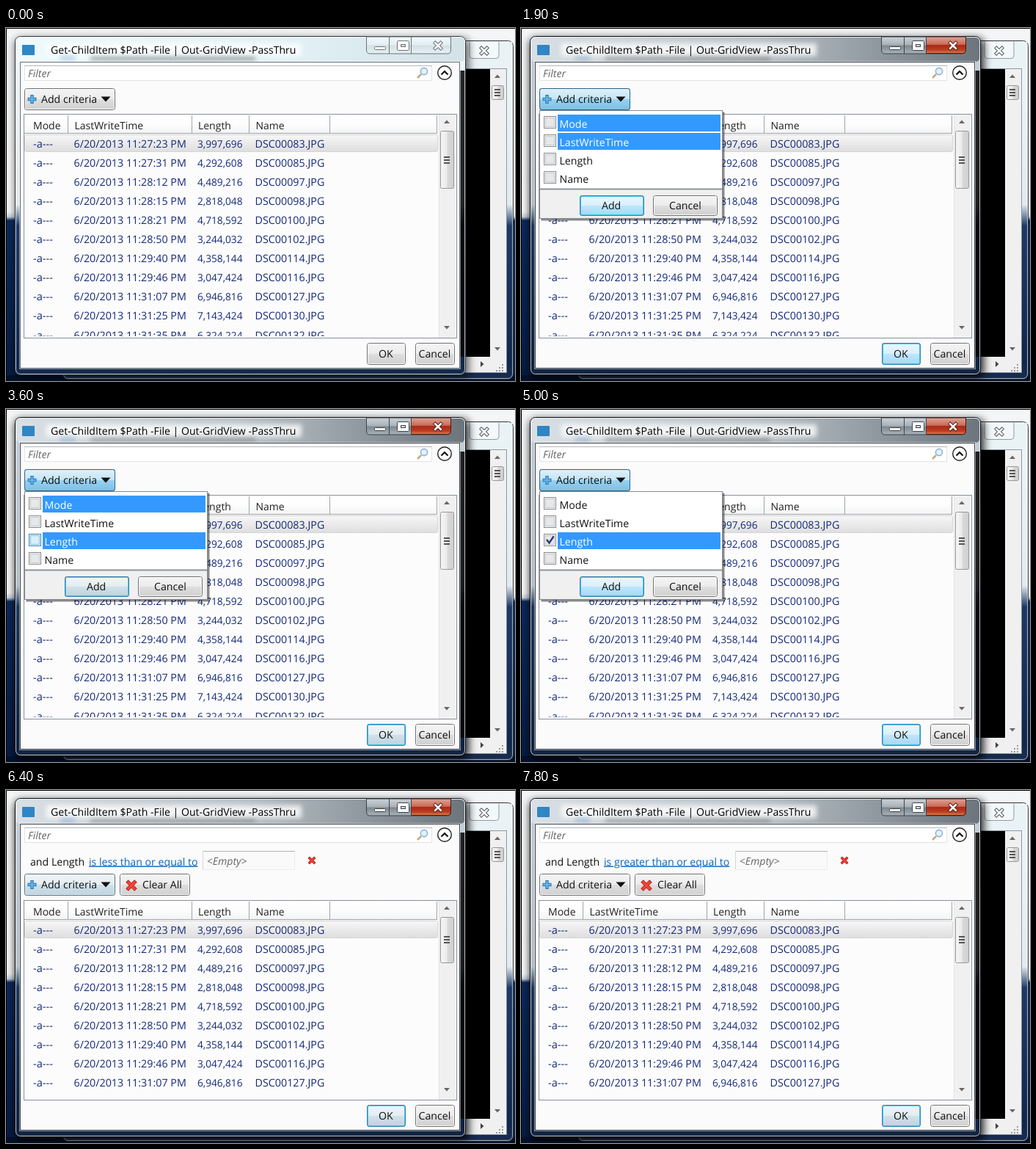
An HTML page that plays this animation: 694 by 481 pixels, repeating every 8 s.

```html
<!DOCTYPE html>
<html lang="en">
<head>
<meta charset="utf-8">
<title>Out-GridView criteria</title>
<style>
  html, body { margin: 0; width: 100%; height: 100%; overflow: hidden; background: #000; }
  svg { display: block; width: 694px; height: 481px; }
  text { font-family: "Open Sans", "Noto Sans", sans-serif; font-size: 14.15px; text-rendering: geometricPrecision; white-space: pre; }
</style>
</head>
<body>
<svg id="stage" viewBox="0 0 694 481" xmlns="http://www.w3.org/2000/svg">
  <defs id="defs"></defs>
  <g id="back"></g>
  <g id="dialog"></g>
</svg>
<script>
const LOOP = 8000;
const el = id => document.getElementById(id);

const gradient = (id, stops, extra = 'x2="0" y2="1"') =>
  `<linearGradient id="${id}" ${extra}>` +
  stops.map(([at, c]) => `<stop offset="${at}" stop-color="${c}"/>`).join('') +
  '</linearGradient>';
const tall = 'gradientUnits="userSpaceOnUse" x1="0" y1="0" x2="0" y2="481"';

el('defs').innerHTML =
  gradient('desk', [[0, '#f4f5f6'], [.52, '#fbfbfb'], [.535, '#c9d5e2'], [.545, '#0b2a5c'], [1, '#061c44']], tall) +
  gradient('glass', [[0, '#eef8fb'], [.5, '#e3eaee'], [.56, '#1d3a66'], [.95, '#10274c'], [1, '#1b2f4e']], tall) +
  gradient('glassOn', [[0, '#c6d0d8'], [.5, '#b4bec7'], [.56, '#1b3559'], [.95, '#0e2140'], [1, '#1a2b45']], tall) +
  gradient('shade', [[0, '#eefafd'], [.6, '#e2f1f5'], [1, '#d3e2e7']], 'x2="1" y2="0"') +
  gradient('shadeOn', [[0, '#d9e0e5'], [.5, '#bcc4ca'], [.8, '#8b949b'], [1, '#6d757c']], 'x2="1" y2="0"') +
  gradient('face', [[0, '#f4f4f4'], [.49, '#ececec'], [.51, '#dedede'], [1, '#d0d0d0']]) +
  gradient('blue', [[0, '#eaf6fd'], [.49, '#d9f0fc'], [.51, '#bee6fd'], [1, '#a7d9f5']]) +
  gradient('deep', [[0, '#e0f0f9'], [.49, '#c4e5f6'], [.51, '#98d1ef'], [1, '#7fbfe2']]) +
  gradient('cap', [[0, '#f3fafc'], [.48, '#e3eef1'], [.52, '#d3e0e4'], [1, '#e6f1f4']]) +
  gradient('capOn', [[0, '#ccd2d7'], [.48, '#a9b1b8'], [.52, '#7e878f'], [1, '#a9b3ba']]) +
  gradient('red', [[0, '#e0a497'], [.46, '#c96a58'], [.5, '#ab2a16'], [.8, '#bd3c22'], [1, '#df8350']]) +
  gradient('picked', [[0, '#f7f7f7'], [1, '#dedede']]) +
  gradient('hover', [[0, '#f7fcfe'], [1, '#dcf1fa']]) +
  gradient('head', [[0, '#fff'], [.5, '#fdfdfd'], [1, '#f2f3f4']]) +
  gradient('thumb', [[0, '#f6f6f6'], [.48, '#ebebeb'], [.52, '#dadada'], [1, '#cfcfcf']], 'x2="1" y2="0"') +
  '<filter id="soft" x="-10%" y="-10%" width="120%" height="120%"><feGaussianBlur stdDeviation="6"/></filter>' +
  '<filter id="blur" x="-20%" y="-100%" width="140%" height="300%"><feGaussianBlur stdDeviation="3"/></filter>';

const rect = (x, y, w, h, fill, extra = '') =>
  `<rect x="${x}" y="${y}" width="${w}" height="${h}" fill="${fill}" ${extra}/>`;
const box = (x, y, w, h, fill, stroke, r = 0) =>
  rect(x + .5, y + .5, w - 1, h - 1, fill, `stroke="${stroke}" rx="${r}"`);
const path = (d, fill, extra = '') => `<path d="${d}" fill="${fill}" ${extra}/>`;
const line = (d, stroke, w = 1) => path(d, 'none', `stroke="${stroke}" stroke-width="${w}"`);
const text = (x, y, s, fill = '#111', extra = '') =>
  `<text x="${x}" y="${y}" fill="${fill}" ${extra}>${s.replace('<', '&lt;')}</text>`;
const fade = (o, body) => o > 0 ? `<g opacity="${o}">${body}</g>` : '';
const italic = 'font-style="italic"';

// value of the last key at or before t
const step = (t, keys) => keys.reduce((v, [at, next]) => t >= at ? next : v, 0);

function cross(x, y, r, w, color) {
  return line(`M${x - r} ${y - r}l${2 * r} ${2 * r}M${x + r} ${y - r}l${-2 * r} ${2 * r}`, color, w);
}
const closeGlyph = (x, y, ink) =>
  cross(x, y, 5.4, 4.6, ink) + cross(x, y, 4.7, 2.6, '#fff');
const redCross = (x, y, r, w) =>
  cross(x, y, r, w, '#b91d1d') + cross(x, y, r - .7, w - 1.6, '#ee4438');
const arrow = (x, y, dir) =>
  path(`M${x - 4} ${y - 2 * dir}h8l-4 ${4.5 * dir}z`, '#666');
const grip = (x, y, w) =>
  [-4, 0, 4].map(d => rect(x - w / 2, y + d - 1, w, 2, '#555')).join('');

// glow 0 is plain, 1 is a full blue face
function button(x, y, w, h, glow = 0, label = '', tx = 0) {
  const edge = glow > .25
    ? box(x + 1, y + 1, w - 2, h - 2, 'none', '#3cc8ee', 2) + box(x, y, w, h, 'none', '#3c7fb1', 3)
    : '';
  return box(x, y, w, h, 'url(#face)', '#707070', 3) +
    box(x + 1, y + 1, w - 2, h - 2, 'none', '#fafafa', 2) +
    fade(glow, box(x + 1, y + 1, w - 2, h - 2, 'url(#blue)', '#7fd4f2', 2)) + edge +
    text(tx, y + h / 2 + 5, label);
}

function backdrop() {
  return rect(0, 0, 694, 481, 'url(#desk)') +
    rect(0, 473, 694, 8, '#04112c') +
    box(77, 17, 615, 462, 'url(#glass)', '#2b3036', 7) +
    box(78, 18, 613, 460, 'none', 'rgba(255,255,255,.6)', 6) +
    rect(600, 19, 90, 37, '#e9f2f5') +
    path('M632 18.5v19q0 4 4 4h32q4 0 4-4v-19', '#f3f8fa', 'stroke="#959ba1"') +
    closeGlyph(652, 31, '#555b62') +
    box(84, 55, 599, 415, '#000', '#8c98a6') +
    rect(660, 56, 22, 392, '#f0f0f0') + rect(85, 448, 597, 21, '#f0f0f0') +
    arrow(670, 66, -1) + arrow(670, 437, 1) +
    box(662, 78, 17, 20, 'url(#thumb)', '#969696', 2) + grip(670, 88, 8) +
    path('M647 454v8l4.5-4z', '#444') +
    [0, 1, 2].map(i => [...Array(i + 1).keys()]
      .map(j => rect(676 - 4 * j, 459 + 4 * i - 1, 2, 2, '#9b9b9b')).join('')).join('') +
    line('M.5 481V.5H694', '#000');
}

function frame(on) {
  const suffix = on ? 'On' : '';
  const ink = on ? '#3c434b' : '#6b7479';
  return fade(on ? .85 : .6, rect(12, 14, 619, 463, '#000', 'filter="url(#soft)" rx="8"')) +
    box(12, 11, 615, 462, `url(#glass${suffix})`, on ? '#0c0f13' : '#30373e', 7) +
    rect(14, 13, 611, 33, `url(#shade${suffix})`, 'rx="5"') +
    fade(on ? .3 : .4, rect(115, 37, 225, 7, '#222', 'filter="url(#blur)"')) +
    fade(.3, rect(74, 34, 20, 10, '#3a78b5', 'filter="url(#blur)"')) +
    rect(55, 21, 348, 17, '#fff', 'filter="url(#blur)" opacity=".8"') +
    rect(619, 58, 7, 390, '#000', 'opacity=".85"') +
    box(13, 12, 613, 460, 'none', 'rgba(255,255,255,.7)', 6) +
    box(18, 45, 602, 420, 'none', 'rgba(255,255,255,.5)') +
    rect(22, 23, 17, 14, '#2f86c4', 'rx="1"') +
    text(61, 35, 'Get-ChildItem $Path -File | Out-GridView -PassThru', '#000', 'style="font-size:14.08px"') +
    path('M491.5 12v18q0 5 5 5h105q5 0 5-5v-18z', `url(#cap${suffix})`, `stroke="${ink}"`) +
    (on ? path('M552.5 12v22.5h49q5 0 5-5V12z', 'url(#red)', 'stroke="#4a1a14"') : '') +
    line('M522.5 12v23M552.5 12v23', ink) +
    box(502, 25, 16, 5, '#fff', ink, 1) +
    box(533, 17, 17, 14, '#fff', ink, 1) + box(538, 22, 7, 4, '#d5dbe1', ink) +
    closeGlyph(589, 24, on ? '#5a2a24' : ink) +
    box(19, 46, 600, 418, '#fbfbfb', on ? '#3d454d' : '#66707a');
}

function filterBar() {
  return box(25, 51, 556, 21, '#fff', '#e1e3e6') + line('M25 51.5H581', '#b5b8bd') +
    text(30, 67, 'Filter', '#666', italic) +
    line('M561 68l5-5', '#c9a977', 2.5) +
    '<circle cx="570" cy="59" r="4.6" fill="#e3f1fb" stroke="#8fb2d3" stroke-width="1.6"/>' +
    '<circle cx="598" cy="61" r="9.3" fill="#fff" stroke="#222" stroke-width="1.4"/>' +
    line('M593.5 63.5l4.5-4.5 4.5 4.5', '#111', 2.2);
}

function addCriteria(y, glow, pressed) {
  return button(25, y, 124, 30) +
    fade(glow, box(25, y, 124, 30, 'url(#blue)', '#3c6f95', 3)) +
    (pressed ? box(25, y, 124, 30, 'url(#deep)', '#2c628b', 3) : '') +
    line(`M35.5 ${y + 9}v12M29.5 ${y + 15}h12`, '#2a76b4', 4.4) +
    line(`M35.5 ${y + 10}v10M30.5 ${y + 15}h10`, '#62b4e8', 2.4) +
    text(48, y + 20, 'Add criteria') +
    path(`M129.5 ${y + 11.5}h13l-6.5 7z`, '#111');
}

// time, length, picture number
const files = [
  ['11:27:23', '3,997,696', '083'], ['11:27:31', '4,292,608', '085'],
  ['11:28:12', '4,489,216', '097'], ['11:28:15', '2,818,048', '098'],
  ['11:28:21', '4,718,592', '100'], ['11:28:50', '3,244,032', '102'],
  ['11:29:40', '4,358,144', '114'], ['11:29:46', '3,047,424', '116'],
  ['11:31:07', '6,946,816', '127'], ['11:31:25', '7,143,424', '130'],
  ['11:31:35', '6,324,224', '132']
];

function grid(y, hovered, glow) {
  const ink = '#15297a';
  const shifted = y > 130;
  // the shorter list ends after nine whole rows
  const rows = files.slice(0, shifted ? 9 : 11).map(([time, size, id], i) => {
    const b = y + 45.5 + 26.1 * i;
    return text(37, b, '-a---', ink, 'style="font-size:14.6px"') +
      text(92.5, b, `6/20/2013 ${time} PM`, ink, 'style="font-size:14.3px"') +
      text(261, b, size, ink, 'style="font-size:13.7px"') +
      text(339.5, b, `DSC00${id}.JPG`, ink, 'style="font-size:14.3px"');
  }).join('');
  const top = y + 23;
  return box(24, y, 591, 423 - y, '#fcfcfc', '#8a9099') +
    rect(25, y + 1, 563, 26, 'url(#head)') +
    line(`M25 ${y + 26.5}H588M84.5 ${y + 2}v25M253.5 ${y + 2}v25M331.5 ${y + 2}v25M441.5 ${y + 2}v25M587.5 ${y + 2}v25`, '#a0a4a9') +
    [[37, 'Mode'], [93.5, 'LastWriteTime'], [262, 'Length'], [340.5, 'Name']]
      .map(([x, s]) => text(x, y + 20.5, s, '#222', 'style="font-size:14px"')).join('') +
    box(25, y + 28, 564, 24, 'url(#picked)', '#d4d4d4', 2) +
    fade(glow, box(25, y + 28 + 26.1 * hovered, 564, 25, 'url(#hover)', '#dceff8', 2)) +
    `<clipPath id="list"><rect x="25" y="${y + 27}" width="564" height="${393 - y}"/></clipPath>` +
    `<g clip-path="url(#list)">${rows}</g>` +
    rect(591, y + 1, 22, 421 - y, '#f0f0f0') + line(`M590.5 ${y + 1}V422`, '#e2e2e2') +
    arrow(601, y + 11, -1) + arrow(601, 408, 1) +
    box(592, top, 19, shifted ? 63 : 79, 'url(#thumb)', '#979797', 2) +
    grip(601, top + (shifted ? 31 : 40), 8);
}

function criterion(op, width) {
  const x = 119 + width;
  return text(33, 102.5, 'and Length') +
    text(113, 102.5, op, '#0a66c2', 'text-decoration="underline"') +
    box(x, 83, 126, 26, '#fafafa', '#ececec') + line(`M${x} 83.5h126`, '#b0b3b7') +
    line(`M${x + .5} 83v26`, '#d5d7d9') +
    text(x + 6, 101.5, '<Empty>', '#666', italic) +
    redCross(x + 149, 96, 4.3, 3.4);
}

const popup = (x, y, w, h) =>
  rect(x + 3, y + 3, w, h, '#000', 'opacity=".22"') +
  rect(x + 2, y + 2, w, h, '#000', 'opacity=".3"') + box(x, y, w, h, '#fff', '#85898e');

function fieldMenu(t, pulse) {
  const lit = [
    t < 3800 ? 1 : 0,
    step(t, [[1900, 1], [2700, .6], [3000, 0]]),
    step(t, [[3100, .5], [3200, 1]]),
    step(t, [[4800, 1], [5000, 0]])
  ];
  const over = step(t, [[3300, 1], [3600, 2], [4200, 0]]);
  const rows = ['Mode', 'LastWriteTime', 'Length', 'Name'].map((name, i) => {
    const y = 118 + 25 * i;
    const hot = over && over === i;
    return box(31, y + 2, 17, 17, '#f6f6f6', hot ? '#3c7fb1' : '#8a8a8a') +
      box(33, y + 4, 13, 13, hot ? '#d7effb' : '#e6e8ea', hot ? '#79c0e8' : '#c4c8cc') +
      (i === 2 && t >= 3800 ? line(`M35 ${y + 10}l3.5 4.5 6-9`, '#31347c', 2.4) : '') +
      fade(lit[i], rect(50, y, 222, 23, '#3399ff')) +
      text(52.5, y + 18, name, lit[i] > .5 ? '#fff' : '#111');
  }).join('');
  const add = t >= 4600 ? 1 : pulse;
  return popup(25, 112, 250, 148) + rows +
    rect(26, 220, 248, 39, '#f0f0f0') + line('M26 219.5H274', '#8f9499', 2) +
    button(80, 228, 88, 28, add, 'Add', 110) +
    button(180, 228, 88, 28, 0, 'Cancel', 202);
}

const operators = ['is less than or equal to', 'is greater than or equal to', 'is between',
  'equals', 'does not equal', 'contains', 'does not contain'];

function operatorMenu(t) {
  return popup(113, 107, 182, 161) + operators.map((name, i) => {
    const y = 109 + 22.6 * i;
    const lit = i === 0 || (i === 1 && t >= 7400);
    return (lit ? rect(115, y, 178, 23, '#3399ff') : '') +
      text(118, y + 17.7, name, lit ? '#fff' : '#111', 'style="font-size:14.1px"');
  }).join('');
}

function scene(t) {
  const active = t >= 1300;
  const filtered = t >= 5400;
  const y = filtered ? 150 : 117;
  const pulse = step(t, [[1400, .3], [1500, .65], [1600, 1], [1800, .9], [1900, 1], [2700, .7],
    [3000, .5], [3100, .4], [3200, .3], [3300, .4], [3800, .9], [4200, .7], [4300, .5],
    [4600, .9], [5300, .5], [5400, .2], [5500, 0], [6400, .4], [6500, .6], [6700, .9],
    [6800, 1], [7700, .6], [7800, .4]]);
  const add = step(t, [[900, .3], [1000, .65], [1100, 1], [5400, .5], [5800, .8], [5900, 1],
    [6100, .9], [6200, .8], [6400, .4], [6500, 0]]);
  const hover = step(t, [[5500, .5], [5600, 1], [5800, .5], [5900, 0]]);
  const menu = step(t, [[1800, .6], [1900, 1], [5300, .6], [5400, 0]]);
  const ops = step(t, [[6700, .6], [6800, 1], [7700, 0]]);
  const changed = t >= 7700;

  return frame(active) + filterBar() +
    (filtered ? criterion(operators[+changed], changed ? 173 : 149) +
      button(155, 114, 96, 30, 0, 'Clear All', 186) + redCross(171, 130, 6, 5) : '') +
    addCriteria(filtered ? 114 : 82, add, t >= 1500 && t < 5400) +
    grid(y, 2, hover) +
    button(492, 429, 53, 30, pulse, 'OK', 508) +
    button(558, 429, 54, 30, 0, 'Cancel', 562.5) +
    fade(menu, fieldMenu(t, pulse)) +
    fade(ops, operatorMenu(t));
}

el('back').innerHTML = backdrop();
let shown = '';

function update(now) {
  const next = scene(Math.floor(now % LOOP / 100) * 100);
  if (next !== shown) el('dialog').innerHTML = shown = next;
}

const start = performance.now();
function tick() {
  update(performance.now() - start);
  requestAnimationFrame(tick);
}
tick();
</script>
</body>
</html>
```
